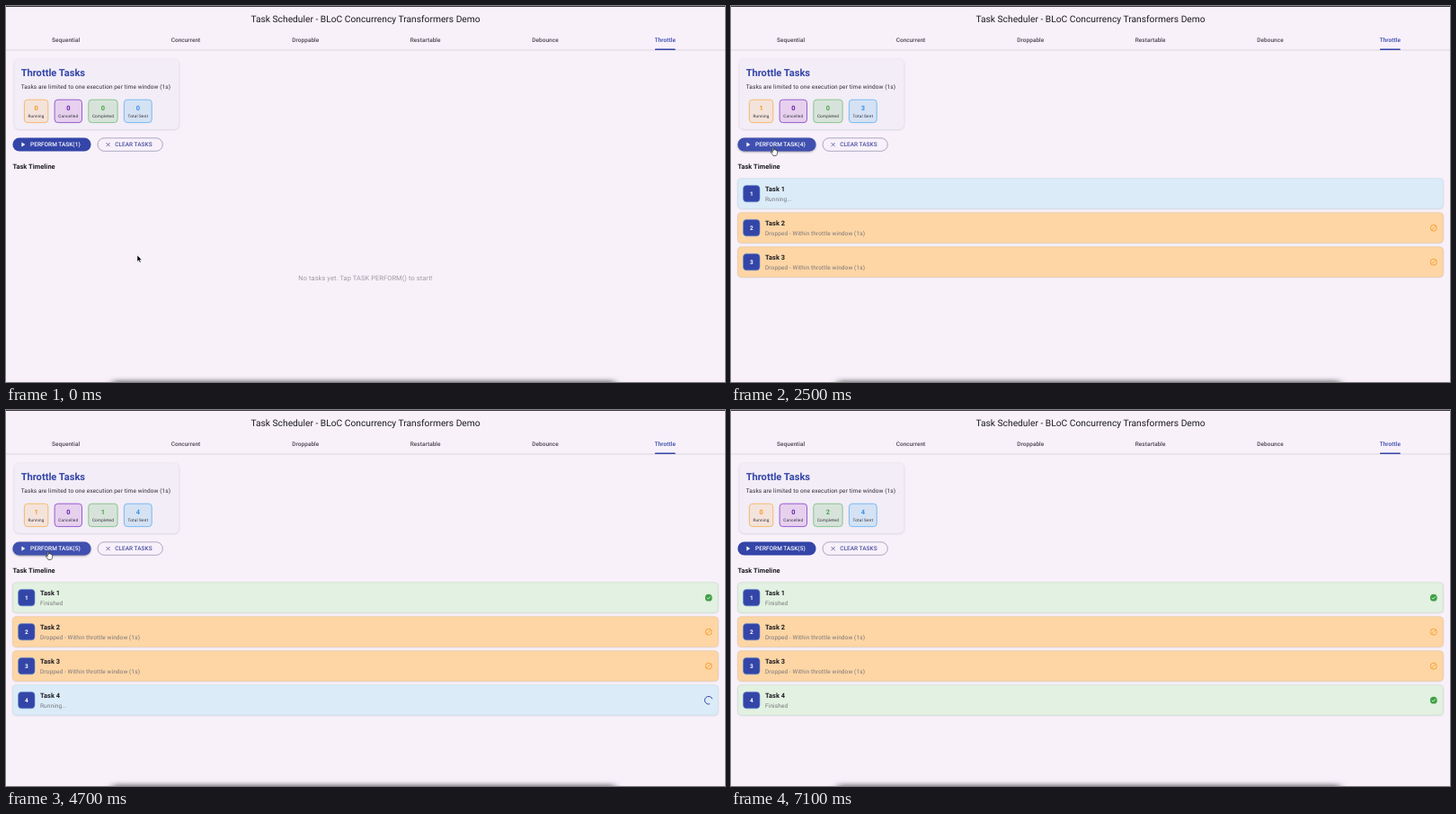
Animation of 800 by 418 pixels, one loop 7.2 s. Source, as an HTML page:

```html
<!DOCTYPE html>
<html lang="en">
<head>
<meta charset="utf-8">
<title>Task Scheduler</title>
<style>
html, body { margin: 0; width: 100%; height: 100%; overflow: hidden; background: #f8f1fa; }
svg { display: block; width: 800px; height: 418px; font-family: Roboto, sans-serif; text-rendering: geometricPrecision; }
</style>
</head>
<body>
<svg id="stage" viewBox="0 0 800 418">
  <defs>
    <filter id="soft" x="-20%" y="-40%" width="140%" height="200%"><feGaussianBlur stdDeviation="1"/></filter>
    <filter id="wide" x="-5%" y="-200%" width="110%" height="500%"><feGaussianBlur stdDeviation="4 2.4"/></filter>
  </defs>
  <g id="base"></g>
  <g id="live"></g>
</svg>
<script>
const LOOP = 7200, STEP = 100;
const INDIGO = '#3445a8', INK = '#1d1b20', GREY = '#77757b';
const TABS = ['Sequential', 'Concurrent', 'Droppable', 'Restartable', 'Debounce', 'Throttle'];
const TAB_W = 800 / TABS.length;

// Each task: start time, and end time when it was accepted
const TASKS = [{ start: 1200, end: 3200 }, { start: 1500 }, { start: 1700 }, { start: 4000, end: 6000 }];

// Pointer path: time, x, y
const PATH = [[0, 146, 277], [300, 146, 277], [900, 50, 160], [1100, 47, 157], [5300, 47, 157],
  [5500, 370, 75], [5600, 500, 42], [5700, 578, 30], [5900, 650, -14]];

const CHIPS = [
  { label: 'Running', x: 20.4, w: 26.4, fill: '#f4e3db', line: '#f6b560', ink: '#f59a23' },
  { label: 'Cancelled', x: 54.1, w: 30.4, fill: '#e6d0ee', line: '#8d4fca', ink: '#6a1fa8' },
  { label: 'Completed', x: 91.8, w: 32.3, fill: '#d7e3da', line: '#7fc184', ink: '#45a44a' },
  { label: 'Total Sent', x: 131.4, w: 30.8, fill: '#d4e2f4', line: '#6fb5f3', ink: '#3b8fe8' }
];

const text = (s, x, y, size, fill, { weight = 400, ls = 0, anchor = 'start' } = {}) =>
  `<text x="${x}" y="${y}" font-size="${size}" fill="${fill}" font-weight="${weight}" ` +
  `letter-spacing="${ls}" text-anchor="${anchor}">${s}</text>`;
const box = (x, y, w, h, r, fill, extra = '') =>
  `<rect x="${x}" y="${y}" width="${w}" height="${h}" rx="${r}" fill="${fill}" ${extra}/>`;
const stroke = (color, width) => `stroke="${color}" stroke-width="${width}"`;
const middle = { anchor: 'middle' };

function base() {
  const cross = 'M111.5 152l4.2 4.2m0-4.2l-4.2 4.2';
  return box(0, 0, 800, 1, 0, '#39343f') +
    box(118, 416.5, 560, 8, 3, '#77727b', 'filter="url(#wide)"') +
    text('Task Scheduler - BLoC Concurrency Transformers Demo', 400, 17.6, 10.25, INK, middle) +
    box(0, 48.7, 800, 0.6, 0, '#c5bfca') +
    box(722, 47.6, 22.8, 1.5, 0.7, INDIGO) +
    box(9.3, 59.6, 183.3, 78, 5.5, '#000', 'opacity=".16" filter="url(#soft)"') +
    box(9.3, 59, 183.3, 78, 5.5, '#f2edf6') +
    text('Throttle Tasks', 16.7, 78, 11.1, INDIGO, { weight: 700 }) +
    text('Tasks are limited to one execution per time window (1s)', 16.7, 92.3, 6.48, '#2f2d34', { ls: 0.116 }) +
    CHIPS.map(c => box(c.x, 104.2, c.w, 25.4, 3.5, c.fill, stroke(c.line, 0.9)) +
      text(c.label, c.x + c.w / 2, 124.2, 4.63, '#2f2d34', { ls: 0.185, anchor: 'middle' })).join('') +
    box(102, 146.8, 72.3, 14.5, 7.25, 'none', stroke('#77749a', 0.6)) +
    `<path d="${cross}" fill="none" ${stroke('#4a4fa2', 0.8)}/>` +
    text('CLEAR TASKS', 121.2, 156.4, 6.48, '#4a4fa2', { weight: 500, ls: 0.046 }) +
    text('Task Timeline', 7.4, 181, 7.41, INK, { weight: 700, ls: 0.07 });
}

const mix = (a, b, p) => a + (b - a) * p;

function pointerAt(t) {
  const i = PATH.findIndex(k => k[0] > t);
  if (i < 0) return PATH.at(-1).slice(1);
  const [t0, x0, y0] = PATH[Math.max(i - 1, 0)], [t1, x1, y1] = PATH[i];
  const p = (t - t0) / (t1 - t0);
  return [mix(x0, x1, p), mix(y0, y1, p)];
}

// cubic-bezier(.4, 0, .2, 1)
function ease(x) {
  if (x <= 0) return 0;
  if (x >= 1) return 1;
  let lo = 0, hi = 1, u = x;
  for (let i = 0; i < 24; i++) {
    u = (lo + hi) / 2;
    const bx = 1.2 * u * (1 - u) ** 2 + 0.6 * u * u * (1 - u) + u ** 3;
    if (bx < x) lo = u; else hi = u;
  }
  return 3 * u * u * (1 - u) + u ** 3;
}

function spinner(age, cx, cy) {
  const p = age / 1333 % 1, r = 4.3;
  const head = ease(p * 2) * 270, tail = ease(p * 2 - 1) * 270;
  const from = tail + age / 2222 * 360 + p * 90 - 90;
  const sweep = Math.max(head - tail, 1);
  const at = deg => {
    const a = deg * Math.PI / 180;
    return `${cx + r * Math.cos(a)} ${cy + r * Math.sin(a)}`;
  };
  return `<path d="M${at(from)}A${r} ${r} 0 ${+(sweep > 180)} 1 ${at(from + sweep)}" fill="none" ${stroke(INDIGO, 1)}/>`;
}

const doneIcon = (x, y) => `<circle cx="${x}" cy="${y}" r="3.9" fill="#3fa045"/>` +
  `<path d="M${x - 1.9} ${y + 0.1}l1.3 1.3 2.6-2.7" fill="none" ${stroke('#fff', 0.8)}/>`;
const dropIcon = (x, y) => `<g fill="none" ${stroke('#f5991f', 0.85)}><circle cx="${x}" cy="${y}" r="3.5"/>` +
  `<path d="M${x - 2.4} ${y + 2.4}l4.8-4.8"/></g>`;

function card(task, i, t) {
  const y = 191.8 + i * 38, mid = y + 16.9, ix = 781.8;
  const [fill, line, note, icon] =
    !task.end ? ['#fed6a5', '#eac592', 'Dropped - Within throttle window (1s)', dropIcon(ix, mid)] :
    t < task.end ? ['#dbecf8', '#c3dcec', 'Running...', spinner(t - task.start, ix, mid)] :
    ['#e2f1e1', '#c8dfc8', 'Finished', doneIcon(ix, mid)];
  return box(7.6, y + 0.5, 784.8, 33.4, 4, '#000', 'opacity=".13" filter="url(#soft)"') +
    box(7.6, y, 784.8, 33.4, 4, fill, stroke(line, 0.6)) +
    box(13.6, y + 7.6, 18.4, 18.4, 3.7, INDIGO, stroke('#5b86cf', 0.6)) +
    text(i + 1, 22.8, mid + 2.3, 6.48, '#fff', { weight: 700, anchor: 'middle' }) +
    text('Task ' + (i + 1), 38, y + 13.9, 7.41, INK, { weight: 700, ls: 0.05 }) +
    text(note, 38, y + 25.5, 6.48, GREY, { ls: 0.116 }) + icon;
}

function performButton(count, hover) {
  return (hover ? box(7.6, 147.6, 86.8, 14.6, 7.3, '#000', 'opacity=".4" filter="url(#soft)"') : '') +
    box(7.4, 146.6, 87.2, 14.8, 7.4, hover ? '#4050b0' : INDIGO) +
    '<path d="M17.4 151.5v5l3.9-2.5z" fill="#fff"/>' +
    text(`PERFORM TASK(${count})`, 27, 156.4, 6.48, '#fff', { weight: 500, ls: 0.046 });
}

function pointer(x, y, hand) {
  const arrow = 'M0 0v7.2l1.7-1.5 1.2 2.6 1.2-.5-1.2-2.6h2.2z';
  const fist = 'M-.8 .6q.7-.9 1.4 0v3l.3-.9q.8-.5 1.2.1l.2.4q.8-.5 1.2.2l.1.5q.8-.4 1 .4v2.2q0 1.5-1.3 2.9h-3.4q-.8-1.6-2.6-3.6 0-1.1 1.1-.6l.8.7z';
  return `<path transform="translate(${x} ${y})" d="${hand ? fist : arrow}" ` +
    (hand ? `fill="#fff" ${stroke('#222', 0.7)}` : `fill="#000" ${stroke('#fff', 0.5)}`) + '/>';
}

function live(t) {
  const sent = TASKS.filter(k => k.start <= t);
  const done = sent.filter(k => k.end <= t).length;
  const running = sent.filter(k => k.end > t).length;
  const counts = [running, 0, done, sent.length];
  const [x, y] = pointerAt(t), [hx, hy] = pointerAt(t - STEP);
  const onButton = x < 94 && y < 162;
  const hovered = hy > 27 && hy < 49 ? Math.floor(hx / TAB_W) : -1;

  return (hovered < 0 ? '' : box(hovered * TAB_W, 27, TAB_W, 21.7, 0, '#e1dbe4')) +
    TABS.map((s, i) => text(s, (i + 0.5) * TAB_W, 40.3, 6.48, i === 5 ? INDIGO : '#49454f',
      { weight: 500, ls: 0.046, anchor: 'middle' })).join('') +
    CHIPS.map((c, i) => text(counts[i], c.x + c.w / 2, 116.3, 7.41, c.ink,
      { weight: 700, anchor: 'middle' })).join('') +
    performButton(sent.length + 1, onButton) +
    (sent.length ? sent.map((k, i) => card(k, i, t)).join('') :
      text('No tasks yet. Tap TASK PERFORM() to start!', 400, 304.8, 7.41, '#9e9aa1', { ls: 0.116, anchor: 'middle' })) +
    pointer(x, y, onButton || y < 49);
}

const layer = document.getElementById('live');
document.getElementById('base').innerHTML = base();
const origin = performance.now();
function frame() {
  const t = (performance.now() - origin) % LOOP;
  layer.innerHTML = live(Math.floor(t / STEP) * STEP);
  requestAnimationFrame(frame);
}
frame();
</script>
</body>
</html>
```
